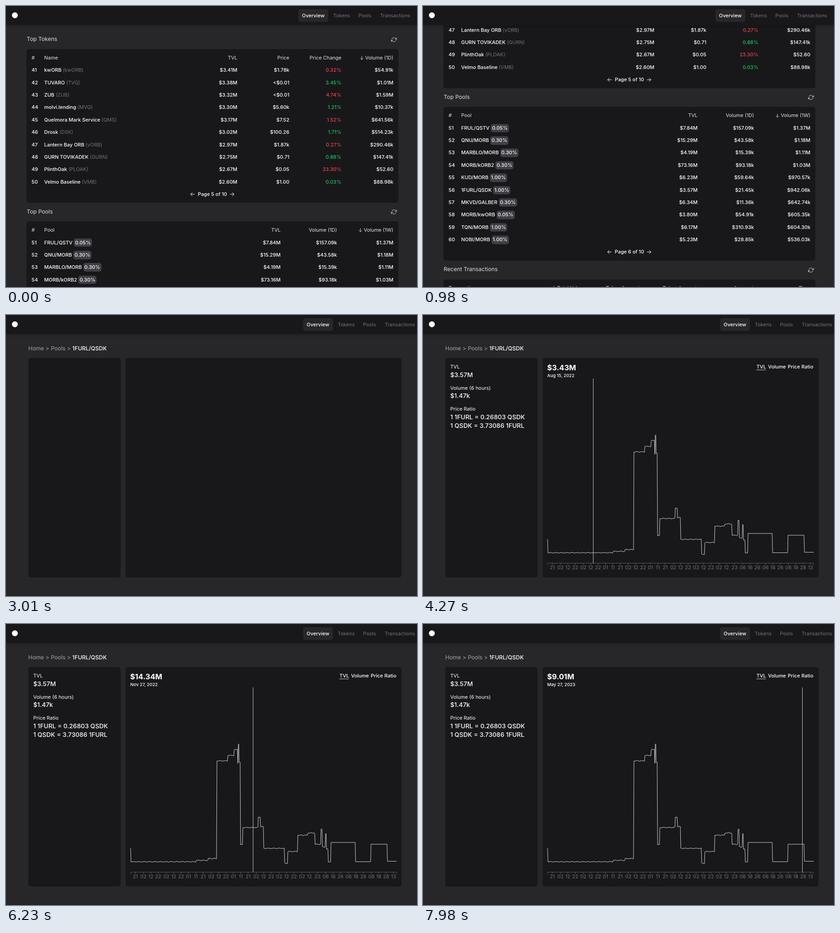
Recreate the animation shown at these times as an HTML page. Size 904 by 620 pixels, loop 8000 ms.

```html
<!DOCTYPE html>
<html lang="en">
<head>
<meta charset="utf-8">
<title>Pool dashboard</title>
<style>
html, body { margin: 0; width: 100%; height: 100%; overflow: hidden; background: #27272a; }
body { position: relative; color: #fff; font: 500 10.96px/20px Inter, sans-serif; }
.page, .layer { position: absolute; left: 0; top: 0; width: 904px; height: 620px; }
.layer { height: 0; }
.t { position: absolute; white-space: pre; }
.box { position: absolute; background: #18181b; border-radius: 5px; }
.head { font-weight: 400; color: #e4e4e7; }
.title { font-size: 12.33px; font-weight: 400; color: #dcdce0; }
.crumb { font-size: 12.33px; font-weight: 400; color: #a1a1aa; }
.crumb b { font-weight: 500; color: #fff; }
.label { font-weight: 400; }
.big { font-size: 13.7px; }
.total { font-size: 16.44px; font-weight: 700; }
.date { font-size: 9.6px; }
.sym, .tick, .nav { font-weight: 400; color: #71717a; }
.up { color: #22c55e; }
.down { color: #ef4444; }
.fee { display: inline-block; padding: 0 2.8px; height: 18.5px; line-height: 18.5px; border-radius: 5px; background: #3f3f46; }
svg { position: absolute; overflow: visible; fill: none; stroke-linecap: round; stroke-linejoin: round; }
#bar { position: absolute; left: 0; top: 0; width: 904px; height: 42px; background: #18181b; box-shadow: 0 4px 7px rgba(0, 0, 0, .12); }
#logo { position: absolute; left: 12.5px; top: 14px; width: 13px; height: 13px; border-radius: 50%; background: #fff; }
#pill { position: absolute; left: 642.5px; top: 7px; width: 66px; height: 27.5px; border-radius: 5px; background: #27272a; }
#edge { position: absolute; left: 0; top: 619px; width: 904px; height: 1px; background: rgba(20, 10, 16, .5); }
#cross { position: absolute; left: 0; top: 140px; width: 1px; height: 407.5px; background: #c8c8cc; }
</style>
</head>
<body>
<div id="list" class="page"><div id="scroll" class="layer"></div></div>
<div id="detail" class="page"></div>
<div id="bar"><div id="logo"></div><div id="nav" class="layer"><div id="pill"></div></div></div>
<div id="edge"></div>
<script>
const $ = id => document.getElementById(id);
const LOOP = 8000, STEP = 70;

function add(parent, html) {
  parent.insertAdjacentHTML('beforeend', html);
  return parent.lastElementChild;
}

// Text is placed by its vertical centre; align is l, r or c.
function text(parent, x, cy, html, cls = '', align = 'l') {
  const side = align === 'r' ? `right:${904 - x}px` : `left:${x}px`;
  const shift = align === 'c' ? ';transform:translateX(-50%)' : '';
  return add(parent, `<div class="t ${cls}" style="${side};top:${cy - 10}px${shift}">${html}</div>`);
}

function box(parent, x, y, w, h) {
  add(parent, `<div class="box" style="left:${x}px;top:${y}px;width:${w}px;height:${h}px"></div>`);
}

const ICONS = {
  left: 'M20 12H4M11 19l-7-7 7-7',
  right: 'M4 12h16M13 5l7 7-7 7',
  down: 'M12 4v16M5 13l7 7 7-7',
  refresh: 'M23 4v6h-6M1 20v-6h6M3.5 9a9 9 0 0 1 14.9-3.4L23 10M1 14l4.6 4.4A9 9 0 0 0 20.5 15'
};

function icon(parent, name, cx, cy, size = 12.5, color = '#fff') {
  add(parent, `<svg viewBox="0 0 24 24" width="${size}" height="${size}" stroke="${color}" stroke-width="1.9"
    style="left:${cx - size / 2}px;top:${cy - size / 2}px"><path d="${ICONS[name]}"/></svg>`);
}

// Overview page: three sections of equal height
const ROW = 27.37, SECTION = 380.4, LEFT = 56.3, NAME = 84, RIGHT = 852;
const TOKEN_COLUMNS = [1, 2, 3, 4].map(i => 394.4 + 114.4 * i);
const POOL_COLUMNS = [2, 3, 4].map(i => RIGHT - 124 * (4 - i));
const list = $('scroll');

function section(index, title, leftHeads, columns, heads, arrowX) {
  const y = index * SECTION;
  text(list, 45.5, 73.4 + y, title, 'title');
  icon(list, 'refresh', 853, 74 + y, 12.5, '#dcdce0');
  box(list, 45, 95 + y, 817.5, 338.7);
  leftHeads.forEach((head, i) => text(list, i ? NAME : LEFT, 114 + y, head, 'head'));
  heads.forEach((head, i) => text(list, columns[i], 114 + y, head, 'head', 'r'));
  icon(list, 'down', arrowX, 114 + y, 11, '#e4e4e7');
}

function rows(index, page, columns, source, format) {
  const top = index * SECTION + 141.3, cy = top + 10 * ROW;
  icon(list, 'left', 410.5, cy);
  text(list, 454, cy, `Page ${page} of 10`, '', 'c');
  icon(list, 'right', 497.5, cy);
  return source.split('\n').map((record, i) => {
    const line = add(list, '<div class="layer"></div>');
    const [name, ...cells] = format(record.split('|'));
    text(line, LEFT, top + i * ROW, page * 10 - 9 + i);
    text(line, NAME, top + i * ROW, name);
    cells.forEach((cell, c) => {
      const cls = cell[0] === '+' ? 'up' : cell[0] === '-' ? 'down' : '';
      text(line, columns[c], top + i * ROW, cls ? cell.slice(1) : cell, cls, 'r');
    });
    return line;
  });
}

const tokens = `kwORB|kwORB|$3.41M|$1.78k|-0.32%|$54.91k
TUVARO|TVQ|$3.38M|&lt;$0.01|+3.45%|$1.01M
ZUB|ZUB|$3.32M|&lt;$0.01|-4.74%|$1.59M
molvi.lending|MVQ|$3.30M|$5.60k|+1.21%|$10.37k
Quelmora Mark Service|QMS|$3.17M|$7.52|-1.52%|$641.56k
Drosk|DSK|$3.02M|$100.26|+1.71%|$514.23k
Lantern Bay ORB|vORB|$2.97M|$1.87k|-0.27%|$290.46k
GURN TOVIKADEK|GURN|$2.75M|$0.71|+0.88%|$147.41k
PlinthOak|PLOAK|$2.67M|$0.05|-23.30%|$52.60
Velmo Baseline|VMB|$2.60M|$1.00|+0.03%|$88.98k`;

const pools = `FRUL/QSTV|0.05%|$7.84M|$157.09k|$1.37M
QNU/MORB|0.30%|$15.29M|$43.58k|$1.18M
MARBLO/MORB|0.30%|$4.19M|$15.39k|$1.11M
MORB/kORB2|0.30%|$73.16M|$93.18k|$1.03M
KUD/MORB|1.00%|$6.23M|$59.64k|$970.57k
1FURL/QSDK|1.00%|$3.57M|$21.45k|$942.06k
MKVD/GALBER|0.30%|$6.34M|$11.36k|$642.74k
MORB/kwORB|0.05%|$3.80M|$54.91k|$605.35k
TQN/MORB|1.00%|$6.17M|$310.93k|$604.30k
NOBI/MORB|1.00%|$5.23M|$28.85k|$536.03k`;

section(0, 'Top Tokens', ['#', 'Name'], TOKEN_COLUMNS, ['TVL', 'Price', 'Price Change', 'Volume (1D)'], 782);
rows(0, 5, TOKEN_COLUMNS, tokens, ([name, symbol, ...cells]) => [`${name} <span class="sym">(${symbol})</span>`, ...cells]);

section(1, 'Top Pools', ['#', 'Pool'], POOL_COLUMNS, ['TVL', 'Volume (1D)', 'Volume (1W)'], 779);
const poolRows = rows(1, 6, POOL_COLUMNS, pools, ([pair, fee, ...cells]) => [`${pair} <span class="fee">${fee}</span>`, ...cells]);

section(2, 'Recent Transactions', ['Transaction'], [0, 1, 2, 3, 4].map(i => 352 + 125 * i),
  ['Total Value', 'Token Amount', 'Token Amount', 'Account', 'Time'], 287);

const nav = $('nav');
text(nav, 651, 20.7, 'Overview');
[[719.5, 'Tokens'], [775, 'Pools'], [822.7, 'Transactions']].forEach(([x, label]) => text(nav, x, 20.7, label, 'nav'));

// Pool page
const detail = $('detail');
text(detail, 49, 73.6, 'Home &gt; Pools &gt; <b>1FURL/QSDK</b>', 'crumb');
box(detail, 49, 95, 202.5, 484);
box(detail, 263, 95, 607, 484);
const loaded = add(detail, '<div class="layer"></div>');

['TVL', 'Volume (6 hours)', 'Price Ratio'].forEach((label, i) => text(loaded, 60, 114 + 46.5 * i, label, 'label'));
['$3.57M', '$1.47k', '1 1FURL = 0.26803 QSDK'].forEach((value, i) => text(loaded, 60, 131.5 + 46.5 * i, value, 'big'));
text(loaded, 60, 243.5, '1 QSDK = 3.73086 1FURL', 'big');
text(loaded, 733.5, 114, 'TVL');
text(loaded, 759, 114, 'Volume');
text(loaded, 858.5, 114, 'Price Ratio', '', 'r');
const total = text(loaded, 273, 116, '', 'total');
const date = text(loaded, 273.3, 134, '', 'date');

// The chart is a staircase: each level holds from its x on.
const START = 274, END = 859;
const levels = [[274, 494], [275, 524.57], [365, 524.5], [418, 521.5], [445, 517.5], [464, 302],
  [488, 290], [502, 277], [510, 307], [511, 264], [513, 305], [516, 487], [521, 449], [555, 426],
  [560, 447], [567, 495], [613, 528], [620, 502], [642, 466], [664, 461], [680, 486], [693, 453],
  [696, 492], [703, 462], [705, 497], [709, 525], [715, 482], [769, 524.5], [803, 485.88], [839, 523.5]];
const levelAt = x => levels.findLast(([from]) => from <= x)[1];
const ripple = x => x < 710 ? 1.1 * Math.sin(x * .9) * Math.sin(x * .37 + 1) : 0;

const curve = Array.from({ length: END - START + 1 }, (_, i) => {
  const x = START + i;
  return `${x},${(levelAt(x) + ripple(x)).toFixed(2)}`;
});

let axis = `M${START} 551.5V547.5H${END}V551.5`, tickX = 284.5;
'21 02 12 22 02 12 22 01 11 21 02 12 22 01 11 21 02 12 22 02 12 22 02 12 23 06 16 26 06 16 26 08 18 28 13'
  .split(' ').forEach((label, i) => {
    if (i) tickX += /02|06|08|23/.test(label) ? 17.9 : 16.2;
    axis += `M${tickX} 547.5v4`;
    text(loaded, tickX, 556.8, label, 'tick', 'c');
  });
add(loaded, `<svg width="904" height="620" style="left:0;top:0">
  <path d="${axis}" stroke="#71717a" stroke-width=".7"/>
  <path d="M733.5 121.2H753.5" stroke="#fff" stroke-width=".8"/>
  <path d="M${curve.join('L')}" stroke="#fff" stroke-width=".8"/></svg>`);
const cross = add(loaded, '<div id="cross"></div>');

// Pointer over the chart: [ms, x]
const pointer = [[4270, 374], [4620, 356.3], [5110, 359.4], [6230, 542.6],
  [6580, 562.5], [7140, 615.5], [7490, 723.5], [7980, 834.4]];

function pointerAt(t) {
  const i = Math.max(1, pointer.findIndex(([ms]) => ms >= t));
  const [t0, x0] = pointer[i - 1], [t1, x1] = pointer[i];
  return x0 + (x1 - x0) * (t - t0) / (t1 - t0);
}

const valueAt = x => (3.43 + (524.5 - levelAt(x)) * .1445).toFixed(2);
function dateAt(x) {
  const day = new Date(Date.UTC(2022, 7, 6 + Math.round((x - 359.4) / 1.617)));
  return day.toLocaleDateString('en-US', { month: 'short', day: 'numeric', year: 'numeric', timeZone: 'UTC' });
}

function scrollAt(t) {
  const p = Math.min(1, Math.max(0, (t - 770) / 280));
  return 254.5 * (1 - (1 - p) ** 3.5);
}

function render(now) {
  const t = Math.floor(now % LOOP / STEP) * STEP;
  const open = t >= 3010, hovering = t >= 4270;
  list.style.transform = `translateY(${-scrollAt(t)}px)`;
  poolRows[5].style.opacity = t >= 2240 ? .7 : 1;
  nav.style.transform = `translateX(${open ? 10.3 : 0}px)`;
  $('list').style.display = open ? 'none' : '';
  detail.style.display = open ? '' : 'none';
  loaded.style.display = t >= 3430 ? '' : 'none';
  cross.style.display = hovering ? '' : 'none';
  const x = hovering ? pointerAt(t) : END;
  cross.style.transform = `translateX(${Math.round(x)}px)`;
  total.textContent = `$${valueAt(x)}M`;
  date.textContent = dateAt(x);
}

function loop() {
  render(performance.now());
  requestAnimationFrame(loop);
}
loop();
</script>
</body>
</html>
```
